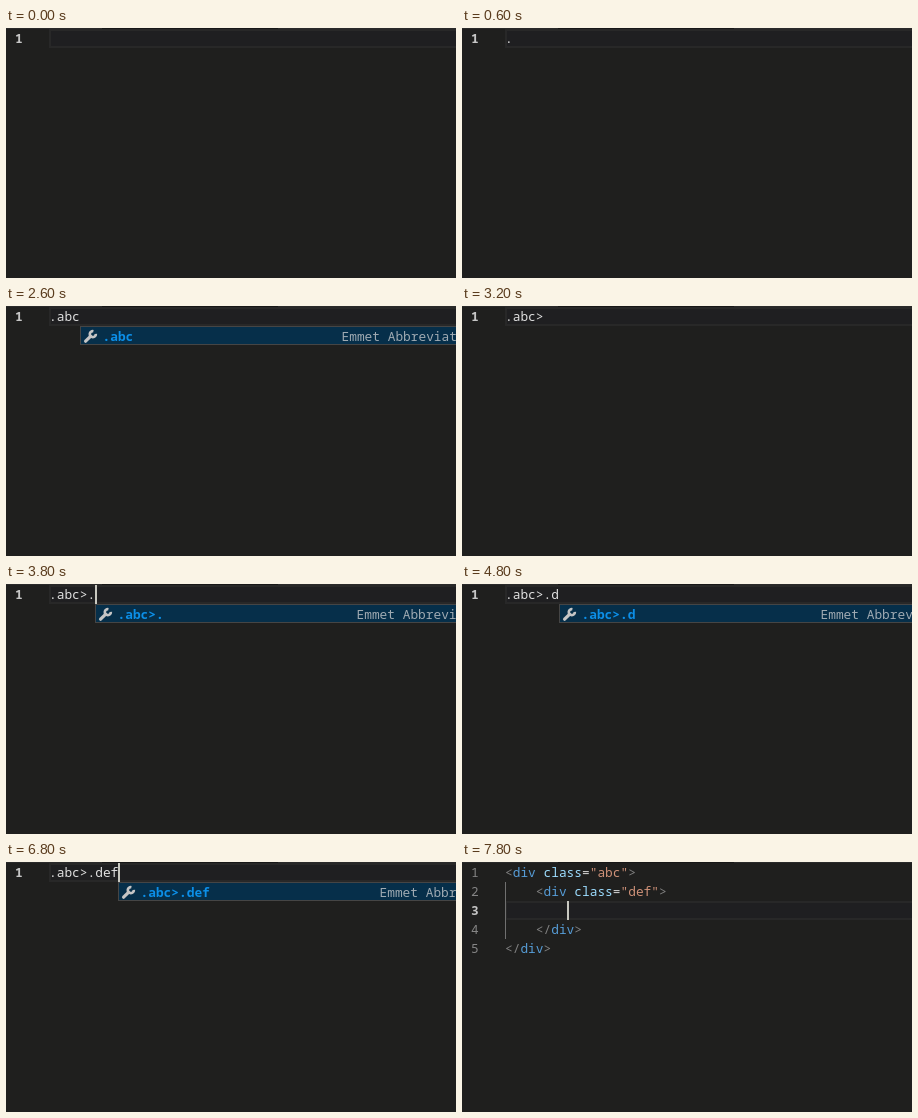
Recreate the animation shown at these times as an HTML page. Size 450 px wide and 250 px high, loop 8000 ms.

```html
<!DOCTYPE html>
<html lang="en">
<head>
<meta charset="utf-8">
<title>Abbreviation expansion</title>
<style>
  html, body { margin: 0; width: 100%; height: 100%; overflow: hidden; background: #1f1f1e; }
  svg { display: block; width: 450px; height: 250px; }
  text { font: 12.83px "Noto Sans Mono", "DejaVu Sans Mono", monospace; white-space: pre; fill: #d4d4d4; }
  .number { fill: #858585; }
  .number.active { fill: #c6c6c6; font-weight: 600; }
  .plain { fill: #e0e0e0; font-weight: 500; }
  .bracket { fill: #808080; }
  .tag { fill: #569cd6; }
  .attr { fill: #9cdcfe; }
  .string { fill: #ce9178; }
  .label { fill: #0c8fe8; font-weight: 600; }
  .detail { fill: #9faab2; font-weight: 500; }
</style>
</head>
<body>
<svg viewBox="0 0 450 250">
  <rect width="450" height="250" fill="#1f1f1e"/>
  <path d="M0 .5H96M272 .5H450" stroke="#2a2a2a"/>
  <path d="M96 .5H272" stroke="#171717"/>
  <rect id="highlight" x="44" width="420" height="17" fill="#1f1f21" stroke="#282828" stroke-width="2"/>
  <path id="guide" stroke="#707070"/>
  <g id="rows"></g>
  <rect id="cursor" width="2" height="19" fill="#c8c8c0"/>
  <g id="popup">
    <rect x=".5" y="20.5" width="460" height="18" fill="#062f4a" stroke="#454545"/>
    <g fill="none" stroke="#c5c5c5">
      <path d="M5.6 35.2L10.5 30.3" stroke-width="3.2" stroke-linecap="round"/>
      <path d="M13.4 25.2A3 3 0 1 0 15.8 27.8" stroke-width="2.7"/>
    </g>
    <text id="label" class="label" x="22.5" y="35"></text>
    <text class="detail" x="261.5" y="35">Emmet Abbreviation</text>
  </g>
</svg>
<script>
  const LOOP = 8000, BLINK = 400, LEFT = 43, CHAR = 7.7, LINE = 19;
  const ABBREVIATION = ".abc>.def";
  const OUTER = '<div class="abc">', INNER = '    <div class="def">', CLOSE = "</div>";

  // One press per abbreviation character, then Tab and Enter.
  const presses = [200, 800, 1200, 1400, 2800, 3800, 4400, 5200, 6000, 7200, 7800];

  const el = id => document.getElementById(id);
  const columnX = column => LEFT + column * CHAR;
  const show = (node, visible) => node.setAttribute("visibility", visible ? "visible" : "hidden");
  const escapeText = s => s.replace(/</g, "&lt;").replace(/>/g, "&gt;");

  // The document and caret after a number of key presses.
  function documentAfter(count) {
    if (count <= ABBREVIATION.length)
      return { lines: [ABBREVIATION.slice(0, count)], row: 0, column: count };
    if (count === ABBREVIATION.length + 1)
      return { lines: [OUTER, INNER + CLOSE, CLOSE], row: 1, column: INNER.length };
    return { lines: [OUTER, INNER, " ".repeat(8), "    " + CLOSE, CLOSE], row: 2, column: 8 };
  }

  function tokenClass(token) {
    if (token[0] === '"') return "string";
    if (token === "class") return "attr";
    return token === "div" ? "tag" : "bracket";
  }

  function paint(line) {
    if (!line.includes("div")) return `<tspan class="plain">${escapeText(line)}</tspan>`;
    return line.trim().replace(/"[^"]*"|class|div|[<>\/]+/g, token =>
      `<tspan class="${tokenClass(token)}">${escapeText(token)}</tspan>`);
  }

  function rowMarkup(line, i, activeRow) {
    const y = 15 + i * LINE;
    const indent = line.length - line.trimStart().length;
    return `<text class="number${i === activeRow ? " active" : ""}" x="9" y="${y}">${i + 1}</text>` +
      `<text x="${columnX(indent)}" y="${y}">${paint(line)}</text>`;
  }

  function renderDocument({ lines, row, column }, suggesting) {
    const top = 1 + row * LINE, x = Math.round(columnX(column));
    el("rows").innerHTML = lines.map((line, i) => rowMarkup(line, i, row)).join("");
    el("highlight").setAttribute("y", top + 1);
    el("guide").setAttribute("d", lines.length > 1 ? `M43.5 20V${1 + (lines.length - 1) * LINE}` : "");
    el("cursor").setAttribute("x", x);
    el("cursor").setAttribute("y", top);
    show(el("popup"), suggesting);
    el("popup").setAttribute("transform", `translate(${x})`);
    el("label").textContent = lines[0];
  }

  const begin = performance.now();
  let shown;
  function tick() {
    const time = (performance.now() - begin) % LOOP;
    const count = presses.filter(press => press <= time).length;
    const suggesting = count > 1 && count <= ABBREVIATION.length && ABBREVIATION[count - 1] !== ">";
    if (count !== shown) renderDocument(documentAfter(shown = count), suggesting);

    // The caret lights up on a press and keeps blinking only while suggestions are open.
    const phase = Math.floor((time - presses[count - 1]) / BLINK);
    show(el("cursor"), phase === 0 || (suggesting && phase % 2 === 0));
    requestAnimationFrame(tick);
  }
  tick();
</script>
</body>
</html>
```
